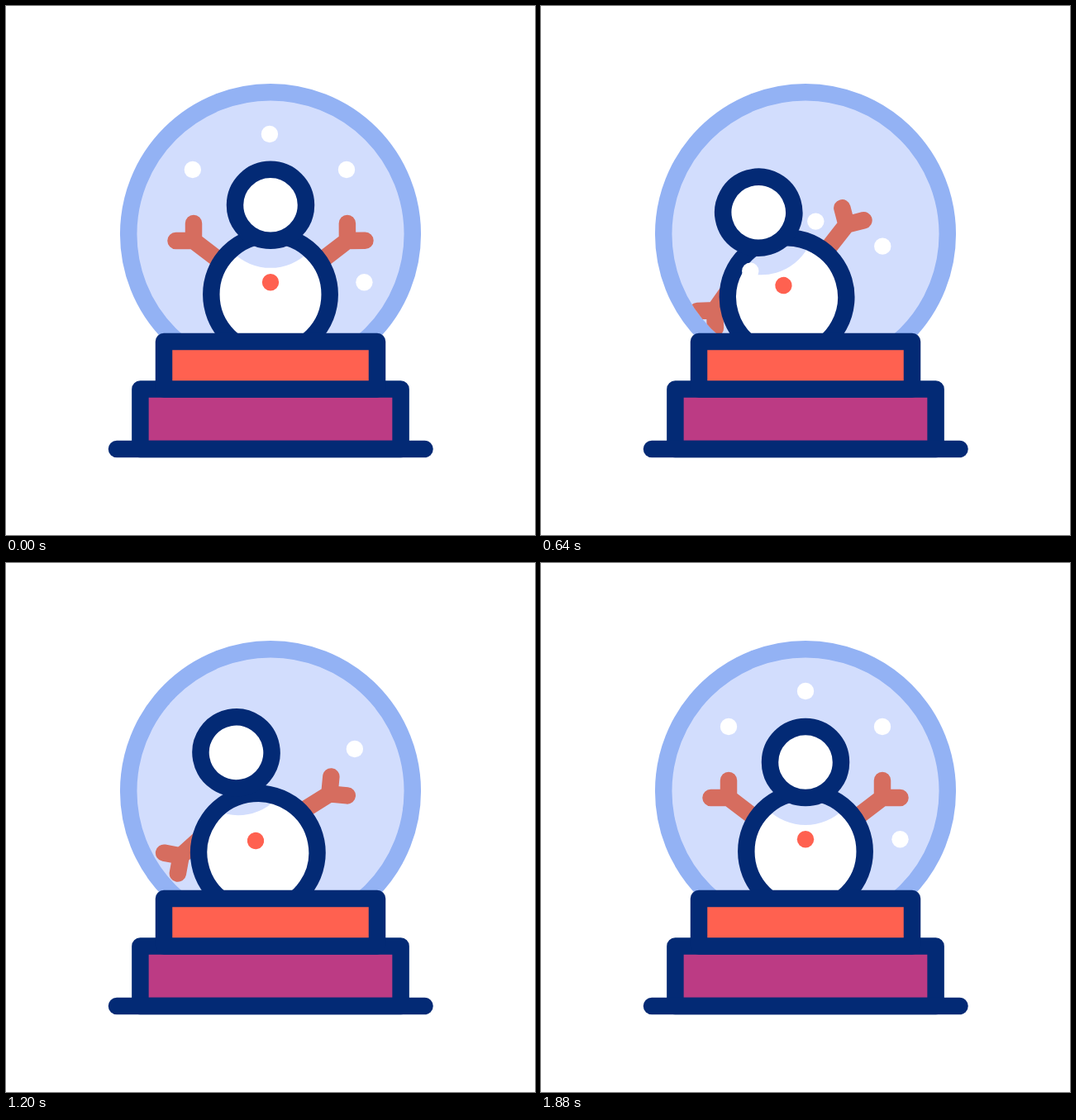
An HTML page that plays this animation: 640 px wide and 640 px high, repeating every 2400 ms.

```html
<!DOCTYPE html>
<html lang="en">
<head>
<meta charset="utf-8">
<title>Snow globe</title>
<style>
  html, body { margin: 0; width: 100%; height: 100%; overflow: hidden; background: #fff; }
  svg { display: block; width: 100%; height: 100%; }
  .ink, .arm { stroke-width: 20.5; stroke-linecap: round; stroke-linejoin: round; }
  .ink { stroke: #032a75; }
  .arm { stroke: #d66d5f; fill: none; }
</style>
</head>
<body>
<svg viewBox="0 0 640 640">
  <defs>
    <clipPath id="glass"><circle cx="320" cy="276" r="161.7"/></clipPath>
    <clipPath id="belly"><circle cx="320" cy="349" r="71.7"/></clipPath>
  </defs>
  <circle cx="320" cy="276" r="171.8" fill="#d2ddfd" stroke="#93b2f4" stroke-width="20.5"/>
  <g clip-path="url(#glass)">
    <g id="man">
      <path id="left" class="arm" d="M205.5 284H227V263M227 284L265 313"/>
      <path id="right" class="arm" d="M434.5 284H413V263M413 284L375 313"/>
      <circle cx="320" cy="349" r="71.7" fill="#fff"/>
      <g clip-path="url(#belly)"><circle id="shade" cx="320" cy="252" r="65" fill="#d2ddfd"/></g>
      <circle class="ink" cx="320" cy="349" r="71.7" fill="none"/>
      <circle cx="320" cy="334.3" r="10.2" fill="#ff6150"/>
      <circle id="head" class="ink" cx="320" cy="241" r="43" fill="#fff"/>
    </g>
    <g id="snow" fill="#fff"></g>
  </g>
  <path class="ink" fill="#bc3b84" d="M162.4 536V463.4H477.6V536Z"/>
  <path class="ink" fill="#ff6150" d="M191 463.4V406H449V463.4Z"/>
  <path class="ink" d="M134 536H506.5"/>
</svg>
<script>
const LOOP = 2400, END = 1880;
const get = id => document.getElementById(id);
const move = (el, value) => el.setAttribute('transform', value);

// Progress from 0 to 1 between two times: even, eased, or up and back down.
const span = (t, from, to) => Math.min(1, Math.max(0, (t - from) / (to - from)));
const ease = (t, from, to) => {
  const u = span(t, from, to);
  return u * u * (3 - 2 * u);
};
const bump = (t, from, to) => Math.sin(Math.PI * span(t, from, to));

// Side to side drift that slows as it goes.
const sway = (u, width, power) => -width * Math.sin(2 * Math.PI * u ** power);

// Flakes fall out of the globe, and a second fall brings them back to rest.
function fallOut(t) {
  const u = t / 1400;
  return [sway(u, 56, 0.8), 360 * u ** 1.57];
}
function fallIn(t) {
  const left = Math.max(0, (END - t) / 1040), u = Math.max(0, 1 - left);
  return [sway(u, 60 - 36 * u, 0.7), -176 * left ** 1.2];
}

const flakes = [[320, 155, 1], [227, 198, 1.1], [413, 198, 0.92], [434.5, 334.3, 1.03]];
const addDot = () => {
  const dot = document.createElementNS('http://www.w3.org/2000/svg', 'circle');
  dot.setAttribute('r', 10.2);
  return get('snow').appendChild(dot);
};
const dots = flakes.map(([x, y, speed]) => ({ x, y, speed, out: addDot(), back: addDot() }));

function draw(t) {
  const lean = 18.6 * ease(t, 0, 310) - 5.4 * span(t, 310, 1080) - 13.2 * ease(t, 1080, 1540);
  const hop = bump(t, 0, 450) + bump(t, 1080, 1552);
  const leftTurn = 76 * (ease(t, 1120, 1540) - ease(t, 0, 340));
  const rightTurn = 21 * bump(t, 620, 1430) - 26 * bump(t, 0, 640);
  const shift = `translate(${-0.26 * lean} ${-22 * hop})`;

  move(get('man'), `rotate(${-lean} 320 429)`);
  move(get('head'), shift);
  move(get('shade'), shift);
  move(get('left'), `rotate(${leftTurn} 265 309)`);
  move(get('right'), `rotate(${rightTurn} 375 309)`);

  for (const { x, y, speed, out, back } of dots) {
    const place = (dot, [dx, dy]) => move(dot, `translate(${x + dx} ${y + dy})`);
    place(out, fallOut(t * speed));
    place(back, fallIn(END - (END - t) * speed));
  }
}

const start = performance.now();
function tick() {
  draw((performance.now() - start) % LOOP);
  requestAnimationFrame(tick);
}
tick();
</script>
</body>
</html>
```
